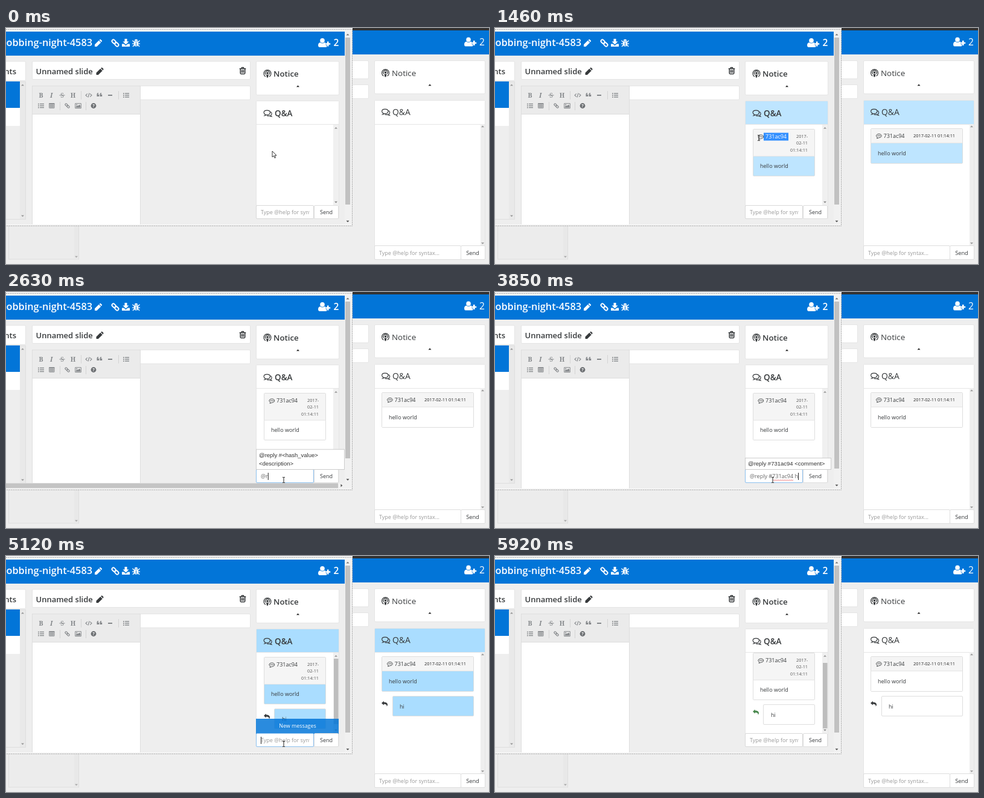
An HTML page for the animation above (6.16 s loop, 800 by 393 pixels).

```html
<!DOCTYPE html>
<html lang="en">
<head>
<meta charset="utf-8">
<title>Slide room chat</title>
<style>
html, body { margin: 0; width: 100%; height: 100%; overflow: hidden; background: #eee; }
svg { display: block; width: 100%; height: 100%; }
text { font-family: "Open Sans", "Noto Sans", sans-serif; white-space: pre; }
.arial { font-family: "Liberation Sans", Arial, sans-serif; }
.serif { font-family: "Noto Serif", serif; }
</style>
</head>
<body>
<svg id="stage" viewBox="0 0 800 393"></svg>
<script>
const LOOP = 6160;
const BLUE = '#0275d8', INK = '#373a3c', EDGE = '#e5e5e5', RULE = '#dedede', TOOL = '#85888b';
const HASH = '731ac94';
const stage = document.getElementById('stage');

// Markup helpers
const rect = (x, y, w, h, fill, more = '') =>
  `<rect x="${x}" y="${y}" width="${w}" height="${h}" fill="${fill}" ${more}/>`;
const card = (x, y, w, h, edge = EDGE, more = '') =>
  rect(x + .5, y + .5, w - 1, h - 1, '#fff', `stroke="${edge}" rx="1.5" ${more}`);
const text = (x, y, size, str, fill = INK, more = '') =>
  `<text x="${x}" y="${y}" font-size="${size}" fill="${fill}" ${more}>${str.replace(/&/g, '&amp;').replace(/</g, '&lt;')}</text>`;
const path = (d, fill, more = '') => `<path d="${d}" fill="${fill}" ${more}/>`;
const line = (d, color, w = 1, more = '') => path(d, 'none', `stroke="${color}" stroke-width="${w}" ${more}`);
const group = (x, y, body) => `<g transform="translate(${x} ${y})">${body}</g>`;
const show = (id, body) => `<g id="${id}">${body}</g>`;
const tri = (x, y, dir, fill = '#505050') => path(`M${x - 2.5} ${y + dir * 1.2}h5l-2.5 ${-dir * 2.6}z`, fill);
const bold = 'font-weight="600"', end = 'text-anchor="end"', mid = 'text-anchor="middle"';

// Icons, centred on their position
const icon = {
  pencil: (x, y, c) => group(x, y, path('M-6 6V2.6L.8-4.2L4.2-.8L-2.6 6ZM1.6-5L2.8-6Q3.4-6.4 4-5.8L5.8-4Q6.4-3.4 5.8-2.8L5-1.6Z', c)),
  link: (x, y, c, s = 1) => group(x, y, `<g transform="rotate(45) scale(${s})" fill="none" stroke="${c}" stroke-width="2">
    <rect x="-7.2" y="-2.5" width="7.6" height="5" rx="2.5"/><rect x="-.4" y="-2.5" width="7.6" height="5" rx="2.5"/></g>`),
  download: (x, y, c) => group(x, y, path('M-2-6.5H2V-2H5L0 3L-5-2H-2ZM-6.5 2H-3L0 5L3 2H6.5V6.5H-6.5Z', c)),
  bug: (x, y, c) => group(x, y, path('M-2.7-3.6a2.7 2.6 0 0 1 5.4 0zM-3.6-2.8H3.6V2Q3 5.6 .5 6V-1H-.5V6Q-3 5.6-3.6 2Z', c) +
    line('M-3.4-1.6L-6-4.2M3.4-1.6L6-4.2M-3 1.2H-6.5M3 1.2H6.5M-3 3L-5.5 6M3 3L5.5 6', c, 1.3)),
  userPlus: (x, y, c) => group(x, y, `<circle cx="-3" cy="-3.6" r="3.8" fill="${c}"/>` +
    path('M-10 4.5Q-10 0-6.3-.2Q-3 2.4 .3-.2L2-.2V3.8H4.2V7Q3.8 7.4 3 7.4H-8Q-10 7.2-10 4.5Z', c) + line('M6.2-2V6M2.2 2H10.2', c, 2.6)),
  podcast: (x, y, c) => group(x, y, line('M-3 5a6 6 0 1 1 6 0M-2.5 1.6a3.5 3.5 0 1 1 5 0', c, 1.2) +
    `<circle cy="-.9" r="1.8" fill="${c}"/>` + path('M-1.9 2Q0 .9 1.9 2L1 6.6H-1Z', c)),
  comments: (x, y, c) => group(x, y, line('M-5.2 4Q-4 3 -4 2Q-6.4.6-6.4-1.2C-6.4-6.2 4-6.2 4-1.2C4 1.8 1 3-2.4 2.6Q-3.6 3.8-5.2 4ZM4.6-2.4C7.6-.6 7 2.4 5 3.4Q5.2 4.6 6.2 5.4Q4 5.2 3 4.2Q.6 4.8-1.4 4', c, 1.2)),
  comment: (x, y, c) => group(x, y, line('M-3.6 3.8Q-2.6 3-2.6 2C-5.8.8-5-3.5 0-3.5C5.6-3.5 5.6 2.6 0 2.6Q-1.6 3.8-3.6 3.8Z', c, .9) +
    [-2, 0, 2].map(i => `<circle cx="${i}" cy="-.4" r=".75" fill="${c}"/>`).join('')),
  trash: (x, y, c) => group(x, y, line('M-3.8-3V4.3Q-3.7 5.4-2.7 5.4H2.7Q3.7 5.4 3.8 4.3V-3M-5.3-3.3H5.3M-2-3.6L-1.4-5.3H1.4L2-3.6', c, 1.5) +
    line('M-1.7-1.3V3.5M0-1.3V3.5M1.7-1.3V3.5', c, 1.2)),
  reply: (x, y, c, more = '') => group(x, y, path('M-5-1L-1.2-4.6V-2.4C3.4-2.4 5.2-.4 5 2Q4.6 3.6 3.6 4.6Q4.4 .6-1.2.6V2.6Z', c, more))
};

function behind() {
  let s = rect(574, 0, 226, 4, '#333') + rect(574, 4, 226, 40, BLUE) +
    icon.userPlus(769, 23, '#fff') + text(784, 28.5, 15.5, '2', '#fff') +
    card(560, 54, 41, 31) + card(560, 94, 41, 24) +
    rect(4.5, 300, 116, 85, '#ececec', `stroke="${RULE}"`) + rect(113, 330, 7, 55, '#e8e8e8') + tri(116.5, 381, -1, '#aaa');
  s += card(610, 54, 184, 56) + icon.podcast(628.5, 75, INK) + text(639, 80, 13.4, 'Notice') + tri(702, 95, 1, '#222');
  s += card(610, 120, 184, 266) + rect(611, 121, 182, 39, '#fff', 'class="tint"') +
    line('M610 160.5H794', EDGE) + icon.comments(629, 140, INK) + text(640, 145, 13.9, 'Q&A') +
    rect(786, 160, 7, 202, '#eee') + tri(789.5, 164, 1, '#999') + tri(789.5, 358.5, -1, '#999') +
    card(610, 362, 144, 24, RULE) + card(753, 362, 41, 24, RULE) +
    text(618, 377.5, 9, 'Type @help for syntax...', '#999') + text(773, 377.5, 9.2, 'Send', INK, mid);
  s += show('msgR', card(622, 167, 153, 59, RULE) + rect(623, 168, 151, 24, '#f5f5f5') + rect(623, 192, 151, 33, '#fff', 'class="tint"') +
    line('M622 191.5H774', EDGE) + icon.comment(636, 180, INK) + text(643.5, 183.3, 9, HASH) +
    text(762, 182.3, 7.3, '2017-02-11 01:14:11', '#222', end) + text(634, 212, 9, 'hello world'));
  s += show('replyR', icon.reply(627, 246, INK) + card(640, 233, 135, 34, RULE, 'class="tint"') + text(652, 253.5, 9, 'hi'));
  return s;
}

function toolbar() {
  const letter = (x, s, more) => text(x, 116, 10.5, s, TOOL, `class="serif" ${mid} ${more}`);
  const rows = (x, y) => [-3, 0, 3].map(d => line(`M${x - 2} ${y + d}h7`, TOOL, 1.4) + rect(x - 5, y + d - .8, 1.7, 1.7, TOOL)).join('');
  const quote = x => path(`M${x} 112V110Q${x} 108 ${x + 2.6} 108V109.3Q${x + 1.7} 109.4 ${x + 1.7} 110.7H${x + 3.7}V114H${x}Z`, TOOL);
  return rect(43.5, 96.5, 179, 231, '#fff', `stroke="${RULE}"`) + rect(43.5, 96.5, 179, 47, '#ebebeb', `stroke="${RULE}"`) +
    letter(58, 'B', 'font-weight="700"') + letter(75, 'I', 'font-style="italic" font-weight="600"') +
    letter(93, 'S', '') + line('M88.5 112H97.5', TOOL) + letter(111, 'H', bold) +
    line('M124.5 105V119M186.5 105V119M89.5 123V137M132.5 123V137', '#d4d4d4') +
    line('M134.8 109.3L132 112L134.8 114.7M139.2 109.3L142 112L139.2 114.7M138 108.5L136 115.5', TOOL, 1.1) +
    quote(150.5) + quote(155.5) + line('M169 112H176', TOOL, 2) +
    rows(199, 112) + rows(58, 129.5) +
    line('M71.7 126H79.9V133.2H71.7ZM71.7 128.7H79.9M71.7 131H79.9M74.5 126V133M77.2 126V133', TOOL) + line('M71.2 126H80.4', TOOL, 1.6) +
    icon.link(101.5, 129.5, TOOL, .62) +
    line('M114.7 125.7H124.3V133.6H114.7Z', TOOL) + path('M115.8 132.5V130.8L117.8 129L119 130.1L121.5 127.6L123.3 129.4V132.5Z', TOOL) + `<circle cx="117.2" cy="127.8" r="1" fill="${TOOL}"/>` +
    `<circle cx="145" cy="129.5" r="4.4" fill="#6d7073"/>` + text(145, 132.4, 7.5, '?', '#fff', `${mid} font-weight="700"`);
}

function messages() {
  return show('scroll',
    show('msgL', card(427, 168, 103, 79, RULE) + rect(428, 169, 101, 44, '#f5f5f5') + rect(428, 213, 101, 33, '#fff', 'class="tint"') +
      line('M427 213.5H530', EDGE) + icon.comment(440.5, 181.5, INK) +
      `<rect id="mark" y="174.5" height="13" fill="#3390ff"/>` + text(448, 184.3, 9, HASH, INK, 'id="hash"') +
      ['2017-', '02-11', '01:14:11'].map((d, i) => text(518, 183 + i * 11.3, 7.3, d, '#555', end)).join('') +
      text(439, 233, 9, 'hello world')) +
    show('replyL', icon.reply(432, 267, INK, 'id="back"') + card(444, 254, 86, 34, RULE, 'class="tint"') + text(457, 274.7, 9, 'hi')));
}

function popup(id, w, rows) {
  const h = rows.length * 14.4 + 4.6, top = 295.5 - h;
  return show(id, rect(414.5, top, w, h, '#fff', 'stroke="#ccc"') +
    rows.map((r, i) => text(419, top + 12.4 + i * 14.4, 9.5, r, '#333', 'class="arial"')).join(''));
}

function front() {
  let s = rect(0, 0, 574, 330, '#eee') + rect(0, 0, 574, 6, '#f4f4f4') + rect(0, 6, 561, 40, BLUE) +
    text(143, 30, 16.3, 'obbing-night-4583', '#fff', `${bold} ${end}`) + icon.pencil(153, 25, '#fff') +
    icon.link(181, 25, '#fff', .95) + icon.download(198.5, 24.5, '#fff') + icon.bug(215.5, 25, '#fff') +
    icon.userPlus(527, 24.5, '#fff') + text(542.5, 30, 15.5, '2', '#fff', bold);
  s += card(-5, 55, 38, 33) + text(17, 77, 13, 'nts', INK, `${bold} ${end}`) +
    rect(-1, 89.5, 33.5, 229, '#eee', `stroke="${RULE}"`) + rect(0, 89, 23, 44, BLUE) + rect(0, 133, 23, 30, '#fff') +
    rect(23, 90, 9, 228, '#e9e9e9') + tri(27.5, 95, 1, '#999') + tri(27.5, 313, -1, '#999');
  s += card(43, 55, 362, 31) + text(49.5, 77, 13, 'Unnamed slide', INK, bold) + icon.pencil(155.5, 72, INK) + icon.trash(392, 71, INK) +
    card(200, 96, 205, 24) + toolbar();
  s += card(414, 55, 138, 57) + icon.podcast(433, 76, INK) + text(443, 81, 13.3, 'Notice', INK, bold) + tri(483.5, 97, 1, '#222') +
    card(414, 121, 138, 197) + rect(415, 122, 136, 39, '#fff', 'class="tint"') + line('M414 160.5H552', EDGE) +
    icon.comments(433.5, 142, INK) + text(445, 147, 13.5, 'Q&A', INK, bold);
  s += `<g clip-path="url(#list)">${messages()}</g>` + rect(542, 161, 9, 134, '#f0f0f0') + tri(546.5, 166.5, 1, '#999') + tri(546.5, 290, -1, '#888') +
    `<rect id="thumb" x="543" width="7.5" height="109" fill="#bdbdbd"/>`;
  s += show('more', rect(414, 271, 137, 26, BLUE, 'opacity=".84"') + text(483, 286, 8.9, 'New messages', '#fff', mid));
  s += card(510, 295, 41, 23, RULE) + text(530.5, 310.3, 9, 'Send', INK, mid) +
    `<rect id="box" x="414.5" y="295.5" width="95" height="22" rx="1.5" fill="#fff"/>
    <g clip-path="url(#field)">${text(422, 310, 9, '', '#999', 'id="typed"')}</g>
    ${line('M461 312.8' + 'l1.5 1.2l1.5-1.2'.repeat(11), '#e55', .8, 'id="wave"')}
    <rect id="caret" y="301" width="1" height="12" fill="#222"/>`;
  s += rect(561, 6, 11, 321, '#f1f1f1') + tri(566, 11, 1, '#777') + `<rect id="page" x="562" y="16" width="8" fill="#c1c1c1"/><g id="down">${tri(566, 322, -1)}</g>` +
    show('across', rect(0, 318, 572, 9, '#f1f1f1') + rect(0, 318.5, 550, 8, '#c4c4c4') + path('M554.5 319.8v5l2.8-2.5z', '#505050'));
  s += popup('allHints', 146, ['@help', '@notice <message>', '@reply #<hash_value>', '<description>']) +
    popup('replyHint', 146, ['@reply #<hash_value>', '<description>']) +
    popup('hashHint', 142, [`@reply #${HASH} <comment>`]);
  s += rect(0, 327, 573, 3, '#f4f4f4') + rect(572, 0, 2, 330, '#f4f4f4') +
    line('M0 2.5H573.5V329.5H0', '#a8a8a8', 1, 'stroke-dasharray="2 1"');
  return s;
}

stage.innerHTML = `<defs><clipPath id="list">${rect(415, 161, 127, 134)}</clipPath><clipPath id="field">${rect(421, 297, 82, 20)}</clipPath></defs>` +
  rect(0, 0, 800, 393, '#eee') + behind() + front() +
  show('arrow', path('M0 0V10L2.4 7.8L4 11.5L5.6 10.8L4 7.2H7Z', '#fff', 'stroke="#222" stroke-width=".9"')) +
  show('beam', line('M-2-4.5H-.6L0-4L.6-4.5H2M0-4V4M-2 4.5H-.6L0 4L.6 4.5H2', '#222', 1));

const el = {};
stage.querySelectorAll('[id]').forEach(n => el[n.id] = n);
const tints = stage.querySelectorAll('.tint');

// Timeline
const clamp = v => Math.max(0, Math.min(1, v));
const ramp = (t, a, b) => clamp((t - a) / (b - a));
const within = (t, a, b) => t >= a && t < b;
const set = (node, attrs) => { for (const k in attrs) node.setAttribute(k, attrs[k]); };
const visible = (id, on) => { el[id].style.display = on ? '' : 'none'; };

const cmd = '@reply #' + HASH;
const typing = [[0, ''], [380, 'hel'], [460, 'hello w'], [550, 'hello world'], [700, ''], [2050, '@'], [2630, '@r'], [2710, '@re'],
  [3000, '@reply #'], [3320, cmd], [3620, cmd + ' '], [3850, cmd + ' h'], [4170, cmd + ' hi'], [4970, '']];
const pointer = [[0, 441, 205], [70, 441, 205], [140, 468, 302], [1000, 468, 302], [1300, 487, 182], [1440, 437, 183],
  [1560, 437, 183], [1850, 460, 313], [5300, 460, 313], [5480, 484, 283], [LOOP, 484, 283]];
const caretOff = [[2860, 3000], [3150, 3320], [4330, 4500], [4760, 4970]];

function pointerAt(t) {
  const i = pointer.findIndex(p => p[0] > t);
  const [a, x, y] = pointer[i - 1], [b, u, v] = pointer[i];
  const k = ramp(t, a, b), e = k * k * (3 - 2 * k);
  return [x + (u - x) * e, y + (v - y) * e];
}

function drawInput(t) {
  const value = typing.filter(k => k[0] <= t).pop()[1];
  const focus = within(t, 140, 1300) || within(t, 1850, 5480);
  el.typed.textContent = value || 'Type @help for syntax...';
  const width = value ? el.typed.getComputedTextLength() : 0;
  const shift = Math.max(0, width - 81);
  set(el.typed, { fill: value ? '#666' : '#999', x: 422 - shift });
  set(el.box, { stroke: focus ? '#8cc0ee' : '#d8d8d8' });
  set(el.caret, { x: 422 + width - shift });
  set(el.wave, { transform: `translate(${-shift} 0)` });
  visible('caret', focus && !caretOff.some(([a, b]) => within(t, a, b)));
  visible('wave', within(t, 3620, 4970));
}

function drawChat(t) {
  const level = t < 3000 ? ramp(t, 915, 1170) * (1 - ramp(t, 1320, 1920))
                         : ramp(t, 4920, 5120) * (1 - ramp(t, 5300, 5840));
  const fill = `rgb(${255 - 85 * level},${255 - 34 * level},255)`;
  tints.forEach(n => set(n, { fill }));
  ['msgL', 'msgR'].forEach(id => visible(id, t >= 700));
  ['replyL', 'replyR', 'thumb'].forEach(id => visible(id, t >= 4970));
  visible('more', within(t, 4970, 5480));

  const offset = 7 * ramp(t, 5480, 5600);
  set(el.scroll, { transform: `translate(0 ${-offset})` });
  set(el.thumb, { y: 171 + offset });
  set(el.back, { fill: t >= 5840 ? '#47874b' : INK });

  const marked = within(t, 1310, 1850);
  const left = 486 - 41 * ramp(t, 1310, 1430);
  set(el.mark, { x: left, width: 486 - left });
  visible('mark', marked);
  set(el.hash, { fill: marked && left < 466 ? '#fff' : INK });
}

function drawHints(t) {
  const wide = within(t, 2050, 3320);
  visible('across', wide);
  visible('allHints', within(t, 2050, 2630));
  visible('replyHint', within(t, 2630, 3320));
  visible('hashHint', within(t, 3320, 4970));
  set(el.page, { height: wide ? 261 : 278 });
  set(el.down, { transform: `translate(0 ${wide ? -9.5 : 0})` });
}

function drawPointer(t) {
  const [x, y] = pointerAt(t);
  const arrow = t < 105 || t >= 5400;
  ['arrow', 'beam'].forEach(id => set(el[id], { transform: `translate(${x} ${y})` }));
  visible('arrow', arrow && t < 5840);
  visible('beam', !arrow);
}

function draw(t) {
  drawInput(t);
  drawChat(t);
  drawHints(t);
  drawPointer(t);
}

const start = performance.now();
function tick() {
  draw((performance.now() - start) % LOOP);
  requestAnimationFrame(tick);
}
draw(0);
requestAnimationFrame(tick);
</script>
</body>
</html>
```
